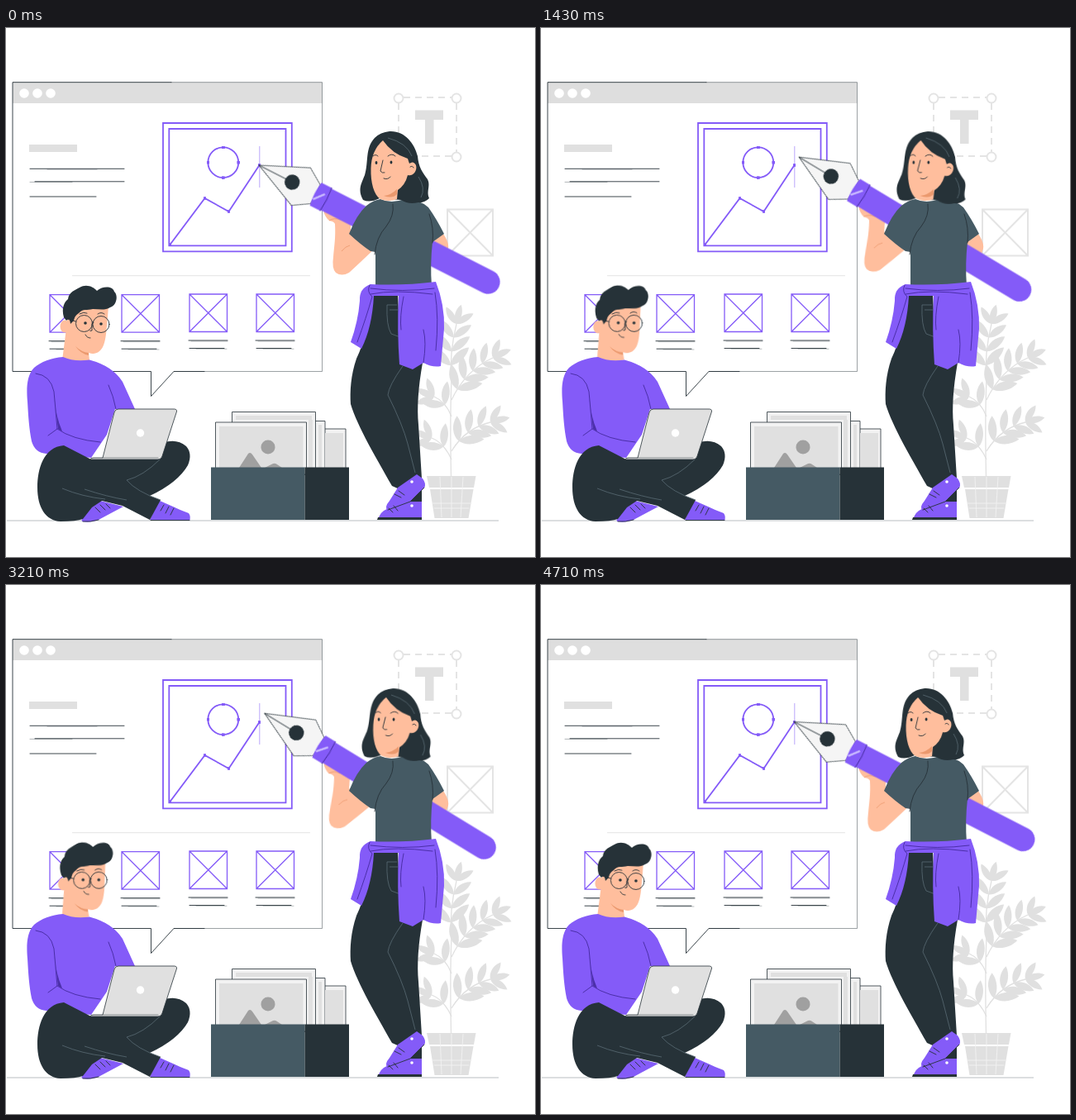
Animation of 640x640 px, one loop 4.78 s. Source, as an HTML page:

```html
<!DOCTYPE html>
<html lang="en">
<head>
<meta charset="utf-8">
<title>Design team</title>
<style>
html, body { margin: 0; width: 100%; height: 100%; overflow: hidden; background: #fff; }
svg { display: block; width: 100%; height: 100%; }
.p { fill: #845bf8; }
.d { fill: #263238; }
.s { fill: #455a64; }
.k { fill: #ffbe9d; }
.shade { fill: #eb996e; }
.w { fill: #fff; }
.g { fill: #e0e0e0; }
.line { fill: none; stroke: #263238; stroke-width: .9; stroke-linecap: round; stroke-linejoin: round; }
.edge { stroke: #263238; stroke-width: .8; stroke-linejoin: round; }
.wire { fill: none; stroke: #845bf8; stroke-width: 1.8; }
.thin { stroke-width: 1.3; }
.nodes { marker: url(#node); }
.pale { fill: none; stroke: #e4e4e4; stroke-width: 2; }
.fold { fill: none; stroke: #5a6b74; stroke-width: .8; }
.dark { fill: none; stroke: #4b2fa8; stroke-width: 1; stroke-linecap: round; }
.twig { fill: none; stroke: #e0e0e0; stroke-width: 1.3; }
.sway { animation: sway 4780ms linear infinite; }
.pen { --turn: 6.7deg; transform-origin: 449px 249px; }
.arm { --turn: 6.7deg; transform-origin: 458px 222px; }
.her { --turn: 2.7deg; transform-origin: 462px 262px; }
.him { --turn: -4.5deg; transform-origin: 88px 410px; }
@keyframes sway { 50% { transform: rotate(var(--turn)); } }
</style>
</head>
<body>
<svg viewBox="0 0 640 640" xmlns="http://www.w3.org/2000/svg">
  <defs>
    <marker id="node" viewBox="-2 -2 4 4" markerWidth="3.6" markerHeight="3.6" markerUnits="userSpaceOnUse">
      <path class="p" d="M-2 -2H2V2H-2Z"/>
    </marker>
    <g id="thumb">
      <path class="wire thin" d="M0 0H45.5V45.5H0ZL45.5 45.5M45.5 0L0 45.5"/>
      <path class="line" d="M-1 56H46M0 65.5H42"/>
      <path class="line" stroke-opacity=".35" d="M2 57H46M8 66.3H45"/>
    </g>
    <path id="leaf" d="M0 0C.25 -.25 .7 -.25 1 0C.7 .2 .25 .2 0 0"/>
  </defs>

  <!-- backdrop -->
  <g class="pale">
    <path d="M481 84H539M545 91V150M539 155H482M475 91V150" stroke-dasharray="8 6"/>
    <circle cx="475" cy="85" r="5.5"/><circle cx="545" cy="85" r="5.5"/><circle cx="545" cy="156" r="5.5"/>
    <path d="M534 219.5H589V275.5H534ZL589 275.5M589 219.5L534 275.5"/>
  </g>
  <path class="g" d="M495 99.5H529V111H517.5V140H507V111H495Z"/>
  <g id="plant" class="g">
    <path class="twig" d="M538.5 543Q537 470 539 425"/>
    <path class="twig leafy" d="M539 425Q536 395 545 358"/>
    <path class="twig leafy" d="M539 450Q556 414 589 399"/>
    <path class="twig leafy" d="M539 512Q556 484 586 477"/>
    <path class="twig leafy" d="M539 470Q532 452 518 446"/>
    <path class="twig leafy" d="M539 522Q530 502 515 496"/>
    <path d="M509 542H568.5L566 556H512ZM513 558H565.5L559.5 593H518.5Z"/>
    <path fill="none" stroke="#f2f2f2" stroke-width=".9" d="M525 543L527 592M539 543V592M553 543L550 592M515 575H562M518 581H560"/>
  </g>
  <path d="M1 596H596" fill="none" stroke="#b9bec1"/>

  <!-- board -->
  <path class="w" d="M8 65.5H382.5V415.5H203L175.5 445.5V415.5H8Z"/>
  <path fill="#dedede" d="M8 65.5H382.5V91H8Z"/>
  <path class="line" stroke-opacity=".5" d="M200 65.7H382.5V415.5H203"/>
  <path class="line" d="M200 65.7H8V415.5H175.5V445.5L203 415.5H240"/>
  <g class="w"><circle cx="22" cy="79" r="5.8"/><circle cx="38" cy="79" r="5.8"/><circle cx="54" cy="79" r="5.8"/></g>
  <path class="g" d="M28 141H86V150H28Z"/>
  <path class="line" d="M29 170.3H143M35 185.8H143M29 204H109"/>
  <path class="line" stroke-opacity=".4" d="M29 186.4H80M50 171H110"/>
  <path fill="none" stroke="#e4e4e4" d="M80 299.7H368"/>
  <g class="wire">
    <path d="M190 115H345.8V270.3H190ZM197.3 122H338.5V263.3H197.3Z"/>
    <path class="nodes" d="M262.8 144.3a18.4 18.4 0 0 1 18.4 18.4a18.4 18.4 0 0 1 -18.4 18.4a18.4 18.4 0 0 1 -18.4 -18.4a18.4 18.4 0 0 1 18.4 -18.4"/>
    <path class="nodes" d="M198.5 262L240.5 206L269.5 222L306.5 166"/>
    <path stroke-opacity=".55" stroke-width="1" d="M306.8 143V193"/>
  </g>
  <use href="#thumb" x="53" y="322.7"/>
  <use href="#thumb" x="140" y="322.7"/>
  <use href="#thumb" x="222" y="322"/>
  <use href="#thumb" x="303" y="322"/>

  <!-- crate of pictures -->
  <g class="edge" fill="#f2f2f2">
    <path d="M382 485H411V540H382Z"/>
    <path d="M355 475.5H386V540H355Z"/>
    <path d="M273.5 464.5H374.5V540H273.5Z"/>
    <path d="M253.5 477H363.5V540H253.5Z"/>
  </g>
  <path class="g" d="M386 490H408V540H386ZM378 480H382V540H378ZM278 469H370V474H278ZM366 474H371V540H366ZM258 482H359.5V535H258Z"/>
  <g fill="#a0a0a0">
    <circle cx="317" cy="507" r="8.5"/>
    <path d="M282 532L293 515Q295.500 512.500 298 516L309 532ZM313 532L322 527.5Q325 526 328 528L334 532Z"/>
  </g>
  <path class="s" d="M248 531.5H361.5V595H248Z"/>
  <path class="d" d="M361.5 531.5H415V595H361.5Z"/>

  <!-- man -->
  <g class="sway him">
    <path class="k" d="M76 335H124Q123 352 121.500 365C120 384 116 394 104 394L100 393L101 402Q84 408 68 402L72 371Z"/>
    <path class="shade" d="M84 385Q91 392 100 393V396Q90 394 84 385Z"/>
    <ellipse class="k" cx="71" cy="361" rx="5.5" ry="7.5"/>
    <path class="d" d="M70 350C67 340 70 332 75 328C76 319 84 317 89 314C97 309 106 313 110 318C117 312 129 312 131 319C136 323 134 336 126 338C120 342 112 340 105 340C98 342 93 339 88 345Q83 348 82 354L78 358Q77 349 73 354Z"/>
    <g class="line">
      <circle cx="94.5" cy="357.5" r="10"/><circle cx="115" cy="358.5" r="10"/>
      <path d="M74 352L84.5 355M104.5 356H106M104 358L104 366Q101 367 101 366M96 371Q98 375 102 375M89 346Q94 343 98 345M111 346Q115 343 119 346"/>
    </g>
    <circle class="d" cx="96" cy="357" r="1.8"/><circle class="d" cx="115" cy="358" r="1.8"/>
  </g>
  <path class="p" d="M69 398C55 399 42 404 34 411C24 421 25 440 26 452C27 470 28 485 31 500Q35 514 49 515L103 520L122 492L132 461H156L141 428Q129 409 101 401.5Q82 404 69 398Z"/>
  <path class="dark" d="M36 418Q54 420 58 440L62 485L51 493M62 485Q80 498 114 501M124 432Q130 445 133 461"/>
  <path fill="#4b2fa8" d="M58 443Q60 470 68 488L63 485Z"/>
  <path class="p" d="M92 597C90 588 104 578 114 572L142 579Q125 588 112 595Q102 599 92 597ZM174 595L185 571.5L202 579Q210 583 221 587Q224 591 222 596Z"/>
  <path class="d" d="M70 505C45 507 38 534 38 556C38 580 48 596 66 597Q85 597 93 594L104 580L116 572L141 578L174 595L187 571L174 566Q208 550 220 529Q226 515 218 506Q206 496 190 502L184 522H103Z"/>
  <path class="fold" d="M68 557Q92 567 120 570M95 558Q122 567 146 571M186 522Q166 542 146 547Q158 561 187 571"/>
  <path class="line" d="M108 580L114 586M114 577L120 583M121 576L126 581M191 577L187 584M197 579L193 587M203 581L199 589M93 597Q102 598 112 595M175 595.5H222"/>
  <path class="edge g" d="M136 461H203Q207 461 206.5 464L189 518Q188 522 184 522H102Q102 520 106 520H117L131 465Q132 461 136 461Z"/>
  <path class="line" stroke-opacity=".5" d="M117 520H184"/>
  <circle class="w" cx="162.5" cy="490" r="4.7"/>

  <!-- woman -->
  <path class="k" d="M512 225L529 249Q538 262 534 270L530 280L514 270Z"/>
  <g class="sway arm">
    <path class="k" d="M384 221Q386 229 391 233Q397 234 398 237C399 254 397 264 396 277Q394 291 399 296Q406 301 415 296Q424 288 448 265L440 235L417 250V236L400 222Z"/>
    <path fill="none" stroke="#eb996e" stroke-width=".8" d="M391 233Q397 229 405 232M406 270Q411 264 416 263"/>
  </g>
  <g class="sway pen">
    <g transform="translate(306 166) rotate(27)">
      <path class="edge" fill="#f5f5f5" d="M0 0L57 -25.500L77 -12.5V13L57 25.5Z"/>
      <path class="line" d="M0 0H45"/>
      <circle class="d" cx="45.2" r="9.2"/>
      <path class="p" d="M88 -14.6H311A14.6 14.6 0 0 1 311 14.6H88Z"/>
      <path class="p" d="M77 -15.5H91Q93 0 91 15.5H77Q74 0 77 -15.5Z"/>
      <path class="dark" d="M91 -15.5Q93 0 91 15.5"/>
      <path d="M77 7L87 -5" stroke="#c9b9ff" stroke-width="2.5"/>
    </g>
  </g>
  <path class="d" d="M444 320C440 350 434 380 424 400C417 420 416 440 417 455C425 482 449 522 467 554L476 558L503 545L499 480Q496 450 504 405L478 405L474 322ZM478 576L503 552V577H478Z"/>
  <path class="p" d="M474 556L497 540L504 545Q509 552 506 556L489 573L462 584Q457 580 464 572ZM452 590Q455 583 468 579L477 573H503V594H450Z"/>
  <path class="d" d="M450 592H503V595H449Z"/>
  <path class="line" d="M462 583L489 573L506 556M470 564L478 568M475 560L482 565M463 581L468 586M469 578L474 584"/>
  <circle class="w" cx="491" cy="549" r="1.8"/><circle class="w" cx="491" cy="578" r="1.8"/>
  <path class="fold" d="M480 409Q463 433 462 444Q480 480 486 503L495 538M461 335Q460 360 466 370L477 374M461 335H473M464 341H474"/>
  <path class="s" d="M453 207Q466 213 482 207Q502 208 511 217Q521 231 530 249L516 259Q513 285 515 312H447V271L441 270Q429 262 415 249Q424 226 436 215Q445 208 453 207Z"/>
  <path class="line" d="M468 213Q470 227 460 240Q448 253 446 274M512 225Q518 242 516 260"/>
  <path class="p" d="M441 310Q480 312 520 307Q531 335 530 364L526 409Q516 411 505 405L492 413L476 407Q473 365 475 324H445Q443 362 430 388L417 380Q426 355 428 330Q427 315 441 310Z"/>
  <path class="dark" d="M441 315Q480 320 518 315M441 322Q470 316 516 322M440 311Q436 319 443 325Q436 350 425 380M481 325Q476 350 478 365M519 320Q524 350 520 390M505 405Q509 380 505 365"/>
  <g class="sway her">
    <path class="d" d="M464 125C482 124 494 139 498 155C499 168 504 175 510 183C514 191 508 198 512 206Q506 212 499 211Q487 214 478 208L452 206Q440 212 432 208C425 196 430 188 434 178C439 162 434 146 446 133Q453 126 464 125Z"/>
    <path class="k" d="M456 136Q467 152 486 158L488 164Q493 160 496 166C498 173 492 180 486 178Q483 190 474 196L473 207Q463 211 453 207C445 202 441 187 441.5 170Q442 148 456 136Z"/>
    <path class="shade" d="M473 195Q466 202 457 203Q468 207 473 201Z"/>
    <path class="line" d="M456 160L453 173Q455 176 458 175M457 182Q462 184 465 180M444 155Q447 152 450 155M462 155Q467 151 471 155M489 168Q492 166 493 169"/>
    <ellipse class="d" cx="448" cy="163" rx="1.4" ry="2"/><ellipse class="d" cx="466" cy="162.5" rx="1.4" ry="2"/>
    <path class="fold" d="M462 133Q485 139 491 155M499 180Q508 194 502 205"/>
  </g>
</svg>
<script>
const plant = document.getElementById("plant");

function addLeaf({ x, y }, turn, size) {
  const leaf = document.createElementNS("http://www.w3.org/2000/svg", "use");
  leaf.setAttribute("href", "#leaf");
  leaf.setAttribute("transform", `translate(${x} ${y}) rotate(${turn}) scale(${size})`);
  plant.append(leaf);
}

// Leaves grow in pairs along each twig, with one more at its tip.
for (const twig of document.querySelectorAll(".leafy")) {
  const length = twig.getTotalLength();
  const pairs = Math.round(length / 16);
  for (let i = 1; i <= pairs; i++) {
    const at = length * i / pairs;
    const a = twig.getPointAtLength(at - 1);
    const b = twig.getPointAtLength(at);
    const turn = Math.atan2(b.y - a.y, b.x - a.x) * 180 / Math.PI;
    const size = 33 - 9 * i / pairs;
    addLeaf(b, turn - 45, size);
    addLeaf(b, turn + 45, size);
    if (i === pairs) addLeaf(b, turn, size);
  }
}
</script>
</body>
</html>
```
